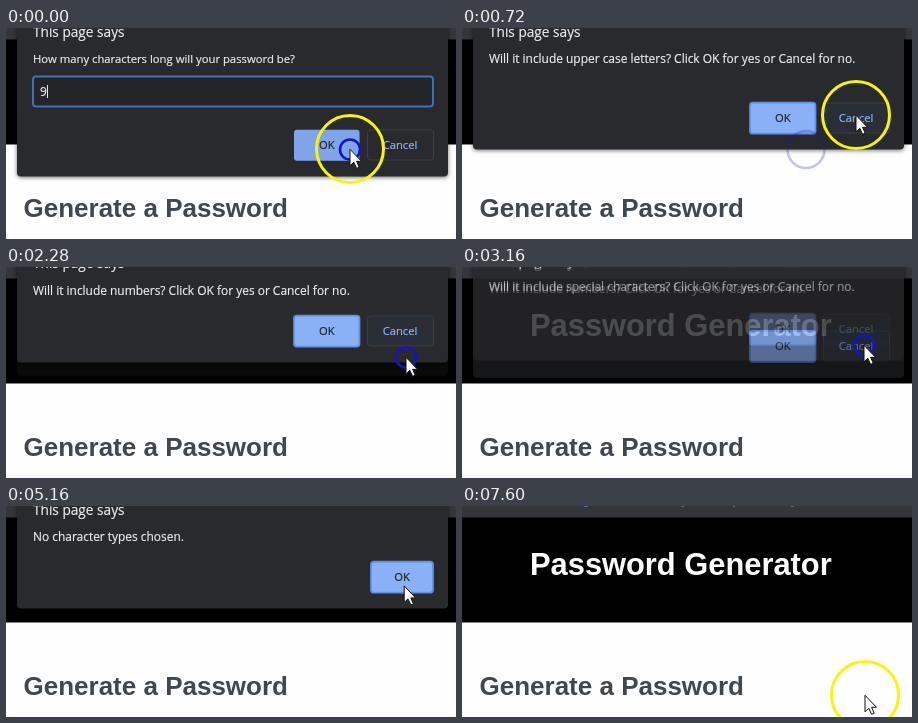
An HTML page for the animation above (8 s loop, 450 px wide and 211 px high).

```html
<!DOCTYPE html>
<html lang="en">
<head>
<meta charset="utf-8">
<title>Password Generator</title>
<style>
  html, body { margin: 0; width: 100%; height: 100%; overflow: hidden; background: #fefefe; }
  svg { display: block; width: 100%; height: 100%; }
  .ui { font-family: "Open Sans", "Noto Sans", sans-serif; font-size: 11.94px; }
  .ui text { fill: var(--ink, #eaebed); stroke: var(--ink, #eaebed); stroke-width: .2; }
  .ui .title { font-size: 13.65px; }
  .ui .label { font-size: 11.2px; font-weight: 500; text-anchor: middle; }
  .ui .ok { --ink: #202124; }
  .ui .cancel { --ink: #8ab4f8; }
  .head { font-family: "Liberation Sans", Arial, sans-serif; font-weight: 700; }
  .panel { fill: #292a2d; filter: drop-shadow(0 1px 2px rgba(0, 0, 0, .55)); }
</style>
</head>
<body>
<svg id="stage" viewBox="0 0 450 211">
  <rect width="450" height="211" fill="#fefefe"/>
  <rect width="450" height="116.5" fill="#000"/>
  <rect width="450" height="11.5" fill="#35363a"/>
  <path d="M219 .4h3M271 .4h2M329 .4h3" stroke="#777a80" stroke-width=".8"/>
  <path d="M122 .4h4" stroke="#5b86c8" stroke-width=".8"/>
  <text class="head" x="68" y="69" font-size="30.85" fill="#fff">Password Generator</text>
  <text class="head" x="17.5" y="189" font-size="26" fill="#41474e">Generate a Password</text>
  <g id="dialogs" class="ui"></g>
  <g id="clicks" fill="none" stroke="#1414c0" stroke-width="2.6"></g>
  <circle id="halo" r="33.5" fill="none" stroke="#f8f410" stroke-width="3"/>
  <path id="cursor" d="M0 0V16.5L3.8 13L6.6 19L9.2 18L6.6 12H11.5Z" fill="#fff" stroke="#111" stroke-width="1"/>
</svg>
<script>
const LOOP = 8000, STEP = 40, SLIDE = 15, FADE = 200, LAG = 65, RIPPLE = 320;
const $ = id => document.getElementById(id);
const clamp = v => Math.max(0, Math.min(1, v));
const span = (t, a, b) => clamp((t - a) / (b - a));
const ease = p => p * p * (3 - 2 * p);

const ask = what => `Will it include ${what}? Click OK for yes or Cancel for no.`;

// mid: vertical centre of the buttons; from/to: when the dialog is called and dismissed
const dialogs = [
  { kind: "prompt", text: "How many characters long will your password be?", mid: 117, from: -1000, to: 100 },
  { kind: "confirm", text: ask("upper case letters"), mid: 90, from: 100, to: 1295 },
  { kind: "confirm", text: ask("lower case letters"), mid: 90, from: 1295, to: 2110 },
  { kind: "confirm", text: ask("numbers"), mid: 71, from: 2110, to: 3040 },
  { kind: "confirm", text: ask("special characters"), mid: 90, from: 3040, to: 4096 },
  { kind: "alert", text: "No character types chosen.", mid: 71, from: 4096, to: 6680 }
];

// press and release times
const clicks = [[0, 560], [1240, 1840], [2080, 2600], [3000, 3520], [4040, 4600], [6640, 7160]];

// start, end, x, y
const start = [344, 121];
const moves = [
  [400, 720, 394, 87], [840, 960, 400, 90], [2640, 2960, 402, 78],
  [3560, 3840, 399, 89], [4880, 5280, 398, 77], [7160, 7560, 403, 189]
];

function okButton(x, w, mid, focus) {
  const edge = focus ? 'stroke="#5f90e6" stroke-width="1.8"' : "";
  return `<rect x="${x}" y="${mid - 15.3}" width="${w}" height="31" rx="3" fill="${focus ? "#8ab0f6" : "#7fa5e8"}" ${edge}/>
    <text class="label ok" x="${x + w / 2}" y="${mid + 4}">OK</text>`;
}

function cancelButton(mid, hover) {
  return `<rect x="361.5" y="${mid - 15}" width="66" height="30" rx="3" fill="${hover ? "#2a2e37" : "none"}" stroke="#3b3e44"/>
    <text class="label cancel" x="394" y="${mid + 4}">Cancel</text>`;
}

function dialogMarkup({ kind, text, mid }) {
  const prompt = kind === "prompt";
  const field = `<rect x="27" y="48.5" width="400" height="30" rx="3" fill="#242528" stroke="#3f70b8" stroke-width="2"/>
    <text x="34" y="67.5">9</text><path d="M41.5 57V70" stroke="#e6e7ea"/>`;
  const buttons = kind === "alert"
    ? okButton(365, 62, mid, true)
    : okButton(288, 65.5, mid, !prompt) + cancelButton(mid, !prompt);
  return `<rect class="panel" x="11" y="-40" width="431" height="${mid + 71.5}" rx="4"/>
    <text class="title" x="27" y="8.5">This page says</text>
    <text x="27" y="35.3" ${prompt ? 'style="font-size:11.3px"' : ""}>${text}</text>
    ${prompt ? field : ""}${buttons}`;
}

function add(parent, tag, markup = "") {
  const el = document.createElementNS("http://www.w3.org/2000/svg", tag);
  el.innerHTML = markup;
  return $(parent).appendChild(el);
}

const panels = dialogs.map(d => add("dialogs", "g", dialogMarkup(d)));
const rings = clicks.map(() => add("clicks", "circle"));

function pointer(t) {
  let [x, y] = start;
  for (const [a, b, tx, ty] of moves) {
    const p = ease(span(t, a, b));
    x += (tx - x) * p;
    y += (ty - y) * p;
  }
  return [x, y];
}

function drawDialog(el, { from, to }, t) {
  const enter = span(t, from + LAG, from + LAG + FADE);
  const leave = span(t, to, to + FADE);
  const alpha = Math.min(1, enter * 2) * Math.min(1, (1 - leave) * 1.6);
  el.setAttribute("opacity", alpha);
  el.setAttribute("transform", `translate(0 ${-SLIDE * (1 - enter + leave)})`);
}

function drawClick(el, [down, up], t) {
  const p = span(t, up, up + RIPPLE);
  const [x, y] = pointer(Math.min(t, down));
  el.setAttribute("cx", x);
  el.setAttribute("cy", y + .5);
  el.setAttribute("r", 10 + 17 * p);
  el.setAttribute("opacity", t < down ? 0 : (1 - p) ** 2);
}

function draw(t) {
  panels.forEach((el, i) => drawDialog(el, dialogs[i], t));
  rings.forEach((el, i) => drawClick(el, clicks[i], t));
  const [x, y] = pointer(t);
  $("cursor").setAttribute("transform", `translate(${x} ${y + .3})`);
  $("halo").setAttribute("transform", `translate(${x} ${y})`);
  $("halo").setAttribute("opacity", 1 - span(t, 860, 960) + span(t, 7280, 7400));
}

function tick() {
  let t = Math.floor(performance.now() % LOOP / STEP) * STEP;
  // the pointer rests here before its last nudge
  if (t > 720 && t < 840) t = 720;
  draw(t);
  requestAnimationFrame(tick);
}
tick();
</script>
</body>
</html>
```
